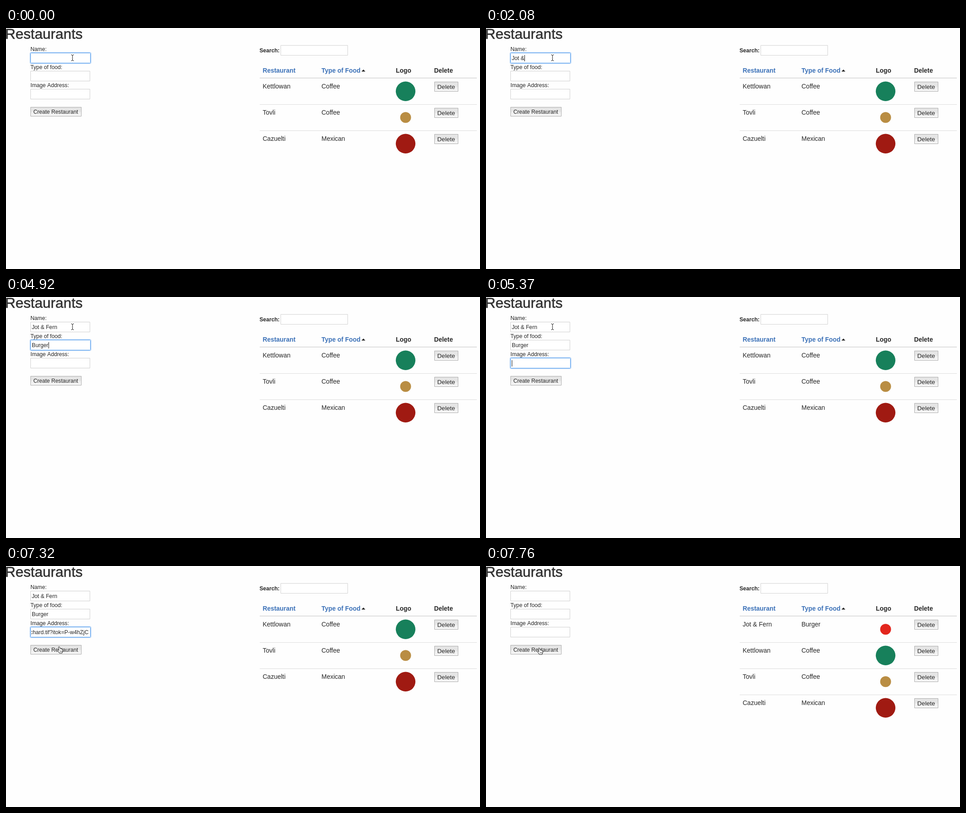
These frames come from a looping animation (1048x534 px, 8 s). An HTML page with a canvas:

```html
<!DOCTYPE html>
<html lang="en">
<head>
<meta charset="utf-8">
<title>Restaurants</title>
<style>
html, body { margin: 0; width: 100%; height: 100%; overflow: hidden; background: #fefefe; }
canvas { display: block; width: 1048px; height: 534px; }
</style>
</head>
<body>
<canvas id="stage"></canvas>
<script>
const W = 1048, H = 534, LOOP = 8000;
const canvas = document.getElementById("stage");
const ctx = canvas.getContext("2d");
const ratio = window.devicePixelRatio || 1;
canvas.width = W * ratio;
canvas.height = H * ratio;

const FAMILY = '"Liberation Sans", Arial, sans-serif';
const INK = "#262626", LINK = "#3a70b7";
const SMALL = "12.2px ", BODY = "14px ", BOLD = "bold 13.9px ";

const NAME = "Jot & Fern", FOOD = "Burger";
const scheme = "http:";
const ADDRESS = scheme + "//www.quillomarkvat.test/art/orchard.tif?itok=P-w4hZjC";

const LABELS = ["Name:", "Type of food:", "Image Address:"];
const ROWS = [
  { name: "Kettlowan", food: "Coffee", color: "#17805b", radius: 21.7 },
  { name: "Tovli", food: "Coffee", color: "#b98d43", radius: 12 },
  { name: "Cazuelti", food: "Mexican", color: "#a01a12", radius: 21.7 }
];
const ADDED = { name: NAME, food: FOOD, color: "#e3261d", radius: 12 };

// time, focused field, text in that field, caret shown
const part = (time, text, count) => [time, text === NAME ? 0 : 1, text.slice(0, count), true];
const STEPS = [
  [0, 0, "", false], [300, 0, "", true],
  part(450, NAME, 1), [590, 0, NAME[0] + " ", true], part(1180, NAME, 1),
  part(1630, NAME, 2), part(1930, NAME, 4), part(2080, NAME, 5), part(2230, NAME, 6),
  part(2380, NAME, 7), part(2680, NAME, 8), part(2980, NAME, 9), part(3130, NAME, 10),
  [3430, 1, "", true], [3870, 1, "", false],
  part(4020, FOOD, 1), part(4320, FOOD, 2), part(4470, FOOD, 3),
  part(4620, FOOD, 4), part(4770, FOOD, 5), part(4920, FOOD, 6),
  [5370, 2, "", true], [5820, 2, "", false],
  [6420, 2, ADDRESS, true], [7020, 2, ADDRESS, false], [7460, 2, ADDRESS, true],
  [7610, -1, "", false]
];
const PRESS = 7610, DONE = 7760;

// time, shape, x, y
const POINTER = [
  [0, "beam", 147, 66], [6720, "beam", 147, 70], [6870, "arrow", 145, 84],
  [7020, "beam", 140, 110], [7170, "arrow", 128, 162], [7310, "hand", 119, 185],
  [7460, "hand", 119, 188]
];

function current(list, t) {
  let found = list[0];
  for (const item of list) if (item[0] <= t) found = item;
  return found;
}

function text(str, x, y, font = BODY, color = INK) {
  ctx.font = font + FAMILY;
  ctx.fillStyle = color;
  ctx.fillText(str, x, y);
}

function rect(x, y, w, h, color) {
  ctx.fillStyle = color;
  ctx.fillRect(x, y, w, h);
}

function outline(x, y, w, h, color, radius = 0) {
  ctx.strokeStyle = color;
  ctx.lineWidth = 1;
  ctx.beginPath();
  ctx.roundRect(x + 0.5, y + 0.5, w - 1, h - 1, radius);
  ctx.stroke();
}

function polygon(points, fill, stroke) {
  ctx.beginPath();
  points.forEach(([x, y]) => ctx.lineTo(x, y));
  ctx.closePath();
  ctx.fillStyle = fill;
  ctx.fill();
  if (stroke) {
    ctx.strokeStyle = stroke;
    ctx.lineWidth = 1;
    ctx.stroke();
  }
}

function field(index, value, focused, caret) {
  const y = 55 + index * 40;
  rect(54, y, 132, 23, "#fff");
  if (focused) {
    outline(52, y - 2, 137, 27, "rgba(90,160,240,.22)", 3);
    outline(53, y - 1, 135, 25, "rgba(90,160,240,.6)", 2);
    outline(54, y, 133, 23, "#68a9ee", 1);
  } else {
    outline(54, y, 132, 23, "#cfcfcf");
  }
  ctx.save();
  ctx.beginPath();
  ctx.rect(56, y + 1, 129, 21);
  ctx.clip();
  ctx.font = SMALL + FAMILY;
  const width = ctx.measureText(value).width;
  const left = focused ? Math.min(57, 182.5 - width) : 57;
  text(value, left, y + 16, SMALL);
  if (caret) rect(Math.round(left + width), y + 5, 1, 14, "#111");
  ctx.restore();
}

function button(label, x, y, w, h, font, pressed) {
  const shade = ctx.createLinearGradient(0, y, 0, y + h);
  if (pressed) {
    shade.addColorStop(0, "#acacac");
    shade.addColorStop(1, "#b8b8b8");
  } else {
    shade.addColorStop(0, "#e3e3e3");
    shade.addColorStop(0.5, "#e7e7e7");
    shade.addColorStop(0.55, "#efefef");
    shade.addColorStop(1, "#f6f6f6");
  }
  rect(x, y, w, h, shade);
  outline(x, y, w, h, pressed ? "#a0a0a0" : "#adadad");
  text(label, x + 6.5, y + h / 2 + 4.5, font, pressed ? "#3c4048" : INK);
}

function form(t) {
  const [, focus, typed, caret] = current(STEPS, t);
  const values = t >= DONE ? ["", "", ""]
    : [t >= 3430 ? NAME : "", t >= 5370 ? FOOD : "", t >= PRESS ? ADDRESS : ""];
  if (focus >= 0) values[focus] = typed;
  LABELS.forEach((label, i) => {
    text(label, 54, 51 + i * 40, SMALL);
    field(i, values[i], i === focus, caret && i === focus);
  });
  button("Create Restaurant", 54, 175, 113, 21, "12.1px ", t >= PRESS && t < DONE);
}

function table(t) {
  text("Search:", 560.5, 54, "bold 12.1px ");
  rect(607, 38, 149, 23, "#fff");
  outline(607, 38, 149, 23, "#d2d2d2");

  text("Restaurant", 567.5, 98.5, BOLD, LINK);
  text("Type of Food", 697.5, 98.5, BOLD, LINK);
  text("Logo", 862, 98.5, BOLD);
  text("Delete", 946.5, 98.5, BOLD);
  polygon([[786, 96.5], [794.5, 96.5], [790.2, 92]], "#222");
  rect(561, 110, 480, 1.6, "#d6d6d6");

  const rows = t >= DONE ? [ADDED, ...ROWS] : ROWS;
  rows.forEach((row, i) => {
    const y = 111 + i * 58;
    if (i) rect(561, y, 480, 1, "#dcdcdc");
    text(row.name, 567.5, y + 22.5);
    text(row.food, 697.5, y + 22.5);
    ctx.beginPath();
    ctx.arc(883.5, y + 29.3, row.radius, 0, Math.PI * 2);
    ctx.fillStyle = row.color;
    ctx.fill();
    button("Delete", 947, y + 8, 53, 22, "13.6px ");
  });
}

const SHAPES = {
  beam() {
    rect(-0.5, -5, 1, 11, "#111");
    for (const x of [-3, 1]) {
      rect(x, -7, 2, 1, "#111");
      rect(x, 6, 2, 1, "#111");
    }
    rect(-1, -6, 2, 1, "#111");
    rect(-1, 5, 2, 1, "#111");
  },
  arrow() {
    polygon([[0, 0], [0, 13], [3, 10], [5, 15], [7, 14], [5, 9.5], [9, 9.5]], "#111", "#fff");
  },
  hand() {
    polygon([
      [-3, -5.5], [-1.5, -6.5], [0, -5], [1, -1.5], [3, -2], [4, -1],
      [6, -0.5], [7, 2], [6, 5], [5, 8], [-1, 8], [-3, 5], [-5.5, 1.5],
      [-4.5, 0.5], [-2, 2]
    ], "#fff", "#111");
    for (const x of [0, 2, 4]) rect(x, 2.5, 0.8, 3, "#333");
  }
};

function draw() {
  const t = performance.now() % LOOP;
  ctx.setTransform(ratio, 0, 0, ratio, 0, 0);
  rect(0, 0, W, H, "#fefefe");

  text("Restaurants", -2, 24, "31.8px ", "#333");
  ctx.strokeStyle = "#333";
  ctx.lineWidth = 0.6;
  ctx.strokeText("Restaurants", -2, 24);

  form(t);
  table(t);

  const [, shape, x, y] = current(POINTER, t);
  ctx.translate(x, y);
  SHAPES[shape]();
  requestAnimationFrame(draw);
}
draw();
</script>
</body>
</html>
```
